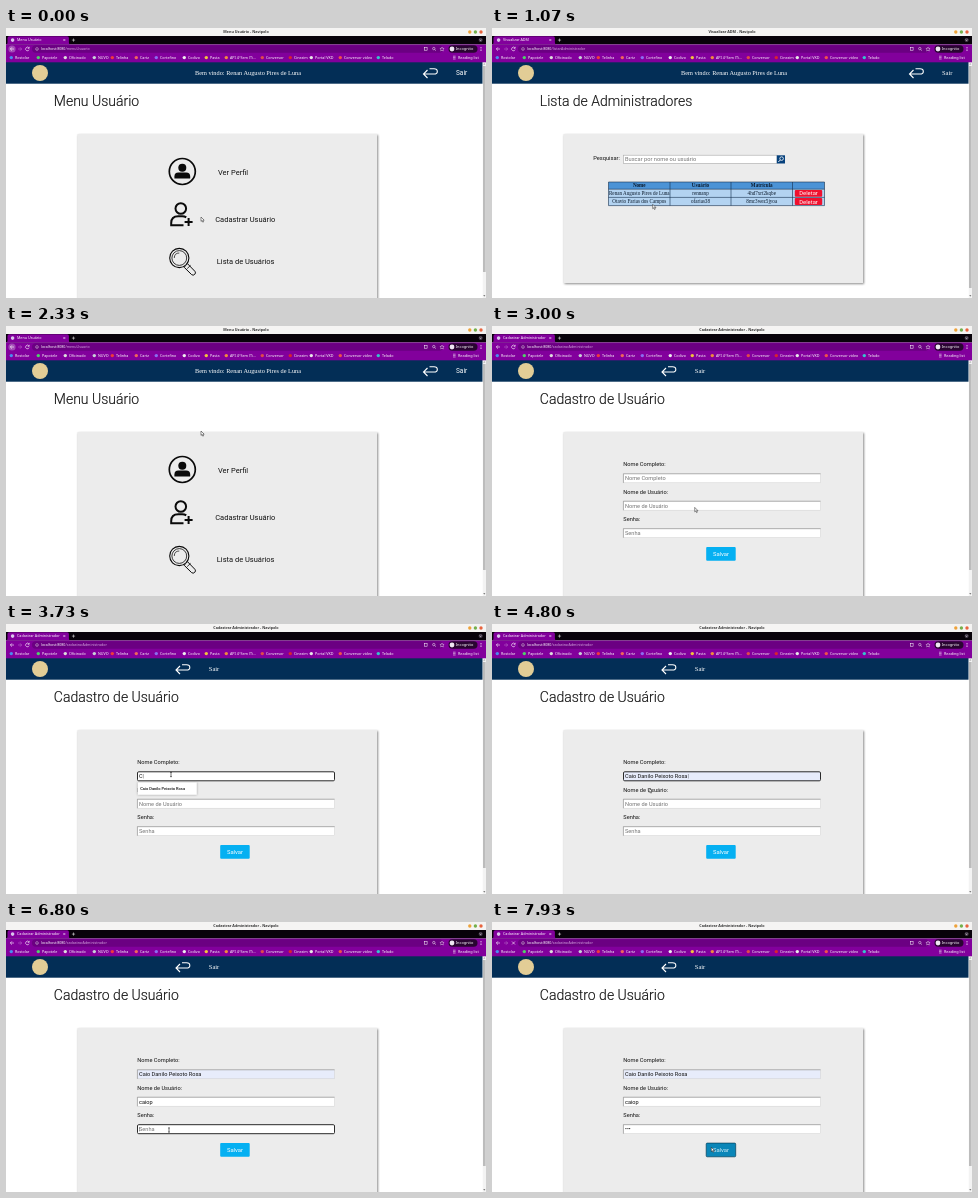
Write an HTML page that moves like this. It is 480 by 270 pixels and loops after 8000 ms.

```html
<!DOCTYPE html>
<html lang="pt-BR">
<head>
<meta charset="utf-8">
<title>Cadastro de Usuário</title>
<style>
html, body { margin: 0; width: 100%; height: 100%; overflow: hidden; background: #fff; }
svg { display: block; width: 100vw; height: 100vh; font-family: Roboto, sans-serif; }
.serif { font-family: "Liberation Serif", serif; }
.ui { font-family: "Noto Sans", sans-serif; }
.card { filter: drop-shadow(1px 1px 1px #8a8a8a); }
.drop { filter: drop-shadow(0 .5px 1px #999); }
</style>
</head>
<body>
<svg id="stage" viewBox="0 0 480 270" xmlns="http://www.w3.org/2000/svg">
  <defs><clipPath id="view"><rect y="34" width="476.7" height="236"/></clipPath></defs>
  <rect width="480" height="270" fill="#fff"/>
  <g clip-path="url(#view)"><g id="page"></g></g>
  <g id="bar"></g>
  <g id="chrome"></g>
  <g id="cursor"></g>
</svg>
<script>
const LOOP = 8000;
const USER = 'Renan Augusto Pires de Luna';
const PICK = 'Caio Danilo Peixoto Rosa';
const LOGIN = 'caiop';
const BROWSER = 'Navipolo';

const text = (x, y, s, size, fill = '#111', extra = '') =>
  `<text x="${x}" y="${y}" font-size="${size}" fill="${fill}" ${extra}>${s}</text>`;
const rect = (x, y, w, h, fill, extra = '') =>
  `<rect x="${x}" y="${y}" width="${w}" height="${h}" fill="${fill}" ${extra}/>`;
const dot = (x, y, r, fill, extra = '') =>
  `<circle cx="${x}" cy="${y}" r="${r}" fill="${fill}" ${extra}/>`;
const line = (d, color, w = 1, extra = '') =>
  `<path d="${d}" fill="none" stroke="${color}" stroke-width="${w}" ${extra}/>`;
const MID = 'text-anchor="middle"';

// Last value whose start time has passed
const step = (t, keys) => keys.reduce((v, [at, next]) => t >= at ? next : v, keys[0][1]);
const ease = p => p * p * (3 - 2 * p);

function tween(t, keys) {
  let i = 0;
  while (i < keys.length - 2 && t >= keys[i + 1][0]) i++;
  const [t0, ...a] = keys[i], [t1, ...b] = keys[i + 1];
  const p = ease(Math.min(1, Math.max(0, (t - t0) / (t1 - t0))));
  return a.map((v, k) => v + (b[k] - v) * p);
}

const PAGES = {
  menu: { tab: 'Menu Usuário', path: 'menuUsuario', thumb: 206 },
  list: { tab: 'Visualizar ADM', path: 'listarAdministrador', thumb: 222 },
  form: { tab: 'Cadastrar Administrador', path: 'cadastrarAdministrador', thumb: 206 }
};
const pageAt = t => step(t, [[0, 'menu'], [600, 'list'], [2000, 'menu'], [2870, 'form']]);
const scrollAt = t => t < 2000 ? tween(t, [[1130, 0], [1400, 9.4]])[0] : 0;

const TRACK = [
  [70, 195, 189], [430, 228, 233], [600, 228, 233], [1000, 160.7, 176.3],
  [1130, 160.7, 176.3], [1430, 163.2, 160.5], [1550, 163.2, 160.5], [1900, 6, 21],
  [2010, 6, 21], [2330, 195, 105], [2620, 212, 189], [2870, 212, 189],
  [3330, 165, 150.5], [3870, 165, 150.5], [4330, 157, 164], [5050, 157, 164],
  [5220, 161, 182], [6270, 161, 182], [6640, 163, 208], [7400, 163, 208],
  [7730, 219.3, 225.2], [8000, 219.3, 225.2]
];
const cursorAt = t => step(t, [[0, 'arrow'], [3250, 'beam'], [4150, 'arrow'], [5130, 'beam'], [7500, 'arrow']]);

const MARKS = [
  [9, 'Rostolar', '#4a8cf0'], [36, 'Papotele', '#4fd06a'], [63, 'Oficinado', '#ddd'], [92, 'NUVO', '#c8d0d8'],
  [110, 'Telinha', '#f03a3a'], [134, 'Cartz', '#f0665a'], [154, 'Cortefino', '#8a6cf0'], [182, 'Codivo', '#eee'],
  [204, 'Pasta', '#f2c33c'], [224, 'API 4°Sem (Ti...', '#f08a3c'], [260, 'Conversor', '#e04a4a'],
  [288, 'Cinezim', '#d8232f'], [309, 'Portal VKD', '#e8e8e8'], [338, 'Conversor video', '#f0504a'], [376, 'Telado', '#35c4cc']
];

function chrome(page, loading) {
  const { tab, path } = PAGES[page];
  const reload = loading
    ? line('M20 19.5l3 3m0-3l-3 3', '#fff', .6)
    : line('M22.9 20a1.8 1.8 0 1 0 .2 1.6M23.2 18.8v1.5h-1.5', '#fff', .6);
  return rect(0, 0, 480, 8, '#f5f4f3')
    + text(240, 5.3, `${tab} - ${BROWSER}`, 3.7, '#333', `${MID} class="ui" font-weight="600"`)
    + dot(463.8, 4, 1.7, '#eea23a') + dot(469.4, 4, 1.7, '#74b04c') + dot(475, 4, 1.7, '#e8643e')
    + rect(0, 8, 480, 8.5, '#08020a')
    + '<path d="M0 16.5q1.5 0 1.5-2V10q0-1.7 1.7-1.7h58q1.7 0 1.7 1.7v4.5q0 2 1.5 2z" fill="#82009c"/>'
    + dot(6.6, 12.1, 1.8, '#d9c7ec')
    + text(11, 13.4, tab, 3.7, '#fff', 'class="ui"')
    + line('M57.3 11l2 2m0-2l-2 2M67.5 10.5v3.2M65.9 12.1h3.2', '#fff', .5)
    + dot(474.6, 12.1, 2, '#4a4050') + line('M473.7 11.7l.9.9.9-.9', '#fff', .5)
    + rect(0, 16.5, 480, 17.8, '#82009c')
    + (page === 'menu' ? dot(6, 21, 3.6, '#a24bb6') : '')
    + line('M8 21H4.4M6 19.3L4.3 21 6 22.7', '#fff', .6)
    + line('M12 21h3.6M14 19.3l1.7 1.7-1.7 1.7', '#b96ac8', .6)
    + reload
    + rect(26, 17.3, 411, 7.4, '#6b0082', 'rx="3.7"')
    + dot(31, 21, 1.4, 'none', 'stroke="#ddd" stroke-width=".45"') + line('M31 20.8v1', '#ddd', .4)
    + `<text x="35" y="22.2" font-size="3.6" class="ui" fill="#fff">localhost:8080<tspan fill="#d6a5e0">/${path}</tspan></text>`
    + rect(418.5, 19.6, 2.6, 2.6, 'none', 'stroke="#fff" stroke-width=".5"')
    + dot(427.8, 20.6, 1.2, 'none', 'stroke="#fff" stroke-width=".5"') + line('M428.7 21.5l1.2 1.2', '#fff', .5)
    + '<path d="M436 19l.6 1.4 1.5.1-1.1 1 .3 1.5-1.3-.8-1.3.8.3-1.5-1.1-1 1.5-.1z" fill="none" stroke="#fff" stroke-width=".4"/>'
    + rect(442.5, 17.3, 29, 7.4, '#2a0532', 'rx="3.7"') + dot(446, 21, 2.4, '#efe6f2')
    + text(449.8, 22.4, 'Incognito', 3.9, '#fff', 'class="ui"')
    + [19.4, 21, 22.6].map(y => dot(475, y, .5, '#fff')).join('')
    + MARKS.map(([x, s, c]) => dot(x - 3.7, 29.6, 1.7, c) + text(x, 31, s, 3.7, '#fff', 'class="ui"')).join('')
    + line('M447 28.2h2.6M447 29.6h2.6M447 31h2.6', '#fff', .5)
    + text(452, 31, 'Reading list', 3.8, '#fff', 'class="ui"');
}

function scrollbar(page, scroll) {
  return rect(476.7, 34, 3.3, 236, '#f3f3f3')
    + rect(477, 38 + scroll * .8, 2.6, PAGES[page].thumb, '#bcbcbc')
    + '<path d="M477.2 36.6h2.2l-1.1-1.3z" fill="#999"/><path d="M477.2 267.2h2.2l-1.1 1.3z" fill="#555"/>';
}

function header(title, backX, sairX, font, hello) {
  return rect(0, 34, 477, 21.7, '#032e56')
    + dot(34, 45, 8, '#e2cd96')
    + (hello ? text(189, 47, `Bem vindo: ${USER}`, 6.3, '#fff', 'class="serif"') : '')
    + line(`M${backX + 4} 42l-4 4 4 4M${backX} 46h10.5q3.3 0 3.3-2.6t-3.3-2.6h-4.5`, '#fff', 1.1)
    + text(sairX, 47.2, 'Sair', 6.5, '#fff', `class="${font}"`)
    + text(47.8, 78.1, title, 14, '#111', 'font-weight="300" stroke="#111" stroke-width=".15"');
}
const card = h => rect(71.5, 106, 299.5, h, '#ececec', 'class="card"');

function menuPage() {
  return header('Menu Usuário', 417.5, 450, '', true) + card(190)
    + dot(176.3, 143.5, 13, 'none', 'stroke="#0a0a0a" stroke-width="1.7"')
    + dot(176.3, 139.7, 4, '#0a0a0a')
    + '<path d="M168.4 150.5v-2q0-4 4-4h7.8q4 0 4 4v2z" fill="#0a0a0a"/>'
    + dot(174.8, 180.5, 5.3, 'none', 'stroke="#0a0a0a" stroke-width="2"')
    + line('M177.5 197.3H165.2V195q0-6.8 7-6.8h4q2.5 0 4 1.2M182.6 190v8M178.6 194h8', '#0a0a0a', 2)
    + dot(173.3, 230, 9.6, 'none', 'stroke="#0a0a0a" stroke-width="1.1"')
    + dot(173.3, 230, 7.4, 'none', 'stroke="#0a0a0a" stroke-width=".8"')
    + line('M168.3 230q0-5 5-5', '#0a0a0a', .7)
    + '<path d="M179.6 237.6l1.9-1.9 7.4 7.6q1.3 1.6-.2 3.1t-3.1.2l-7.4-7.3z" fill="#ececec" stroke="#0a0a0a"/>'
    + line('M181.2 240.6l3.4-3.3', '#0a0a0a', .8)
    + text(212, 147.1, 'Ver Perfil', 7.5)
    + text(209.2, 193.6, 'Cadastrar Usuário', 7.5)
    + text(210.8, 235.6, 'Lista de Usuários', 7.5);
}

function listPage() {
  const cols = [116.5, 178, 239, 300.5, 332.5];
  const rows = [[USER, 'rennanp', '4hd7xrt2kqbe'], ['Otavio Farias dos Campos', 'ofarias38', '8mc3wez5jyoa']];
  const cell = (s, i, y, extra = '') =>
    text((cols[i] + cols[i + 1]) / 2, y, s, 5.1, '#0b1a2c', `${MID} class="serif" ${extra}`);
  return header('Lista de Administradores', 417.5, 450, 'serif', true) + card(149)
    + text(101.2, 132, 'Pesquisar:', 5.7)
    + rect(131.5, 127.2, 153.5, 8.2, '#fff', 'stroke="#aaa" stroke-width=".6"')
    + text(133, 133.2, 'Buscar por nome ou usuário', 5.7, '#757575')
    + rect(284.8, 127.3, 8.2, 8.2, '#06417c')
    + dot(289.6, 130.6, 1.8, 'none', 'stroke="#fff" stroke-width=".8"') + line('M288.3 132l-2 2', '#fff', .9)
    + rect(116.5, 154, 216, 7.2, '#4b93d6') + rect(116.5, 161.2, 216, 16.4, '#b3d3f1')
    + line('M116.5 154h216M116.5 161.2h216M116.5 169.4h216M116.5 177.6h216', '#16304e', .6)
    + line(cols.map(x => `M${x} 154v23.6`).join(''), '#16304e', .6)
    + ['Nome', 'Usuário', 'Matrícula'].map((s, i) => cell(s, i, 159.2, 'font-weight="700"')).join('')
    + rows.map((r, k) => r.map((s, i) => cell(s, i, 167 + k * 8.2)).join('')
      + rect(302.8, 161.9 + k * 8.2, 27.4, 6.8, '#f0102e', 'rx="1"')
      + text(316.5, 167.3 + k * 8.2, 'Deletar', 5.9, '#fff', MID)).join('');
}

function field(y, { value = '', hint = '', focus, auto }) {
  const fill = auto ? '#e7ecfb' : '#fff';
  const box = focus
    ? rect(131.5, y, 197, 9, fill, 'rx="1.2" stroke="#141414" stroke-width=".9"')
    : rect(131.5, y, 197, 9, fill, 'stroke="#cfcfcf" stroke-width=".5"') + line(`M131.4 ${y + 9}V${y}h197.2`, '#8c8c8c', .6);
  const caret = focus ? '<tspan font-weight="300">|</tspan>' : '';
  return box + (hint && !value ? text(133, y + 6.5, hint, 5.6, '#757575') : '')
    + `<text x="133" y="${y + 6.5}" font-size="5.6" fill="#111">${value}${caret}</text>`;
}

function dropdown(y, w, items, pad, hover) {
  const h = items.length * 9 + pad;
  return rect(131.8, y, w, h, '#fff', 'class="drop"')
    + (hover ? rect(131.8, y + pad / 2, w, 9, '#e9e9e9') : '')
    + items.map((s, i) => text(134.2, y + 6.5 + i * 9 + (pad - 2) / 2, s, 4, '#111', 'font-weight="500"')).join('');
}

const NAMES = ['Bruno Tavares Nobre Lins', PICK, 'Davi Moura Queiroz', 'Otavio Farias dos Campos', USER, 'Teste Cadastro'];
const LOGINS = ['rennanp', 'renanap', 'ofarias38', 'renanluna', 'Tabuado', 'Tabuado'];

function formPage(t) {
  const name = step(t, [[0, ''], [3730, PICK[0]], [4670, PICK]]);
  const typed = t < 5800 ? 0 : Math.floor((t - 5800) / 82) + 1;
  const dots = step(t, [[0, 0], [7070, 1], [7130, 2], [7330, 3]]);
  const focus = step(t, [[0, -1], [3400, 0], [5470, 1], [6670, 2], [7800, -1]]);
  const pressed = t >= 7800;
  const list = step(t, [[0, ''], [3470, 'names'], [3730, 'match'], [4670, ''], [5470, 'logins'], [5800, '']]);
  return header('Cadastro de Usuário', 170, 202.8, 'serif') + card(190)
    + text(131.3, 140.4, 'Nome Completo:', 5.65)
    + text(131.3, 167.9, 'Nome de Usuário:', 5.65)
    + text(131.3, 195.2, 'Senha:', 5.65)
    + field(147.8, { value: name, hint: 'Nome Completo', focus: focus === 0, auto: t >= 4670 })
    + field(175.2, { value: LOGIN.slice(0, typed), hint: 'Nome de Usuário', focus: focus === 1 })
    + field(202.7, { value: '•'.repeat(dots), hint: 'Senha', focus: focus === 2 })
    + rect(214.2, 221.1, 29.5, 13.7, pressed ? '#0a86b8' : '#05b0f2', pressed ? 'rx="1" stroke="#07405a" stroke-width=".7"' : 'rx="1"')
    + text(229, 230, 'Salvar', 5.9, pressed ? '#d5eef8' : '#fff', MID)
    + (list === 'names' ? dropdown(158.3, 71, NAMES, 2) : '')
    + (list === 'match' ? dropdown(158.3, 59, [PICK], 3.5, t >= 4250) : '')
    + (list === 'logins' ? dropdown(185.6, 47.5, LOGINS, 3) : '');
}

const POINTERS = {
  arrow: '<path d="M0 0V4.4l1-.9.8 1.7.8-.4-.8-1.6h1.4z" fill="#fff" stroke="#1c1c1c" stroke-width=".5"/>',
  beam: line('M-1-2.3q1 0 1 .7q0-.7 1-.7M0-1.6v3.2M-1 2.3q1 0 1-.7q0 .7 1 .7', '#111', .6)
};

const cache = {};
function put(id, markup) {
  if (cache[id] === markup) return;
  cache[id] = markup;
  document.getElementById(id).innerHTML = markup;
}

function draw(t) {
  const page = pageAt(t), scroll = scrollAt(t);
  put('page', page === 'menu' ? menuPage() : page === 'list' ? listPage() : formPage(t));
  document.getElementById('page').setAttribute('transform', `translate(0 ${-scroll})`);
  put('bar', scrollbar(page, scroll));
  put('chrome', chrome(page, t >= 7800));
  put('cursor', POINTERS[cursorAt(t)]);
  const [x, y] = tween(t, TRACK);
  document.getElementById('cursor').setAttribute('transform', `translate(${x} ${y})`);
}

const start = performance.now();
function tick() {
  draw((performance.now() - start) % LOOP);
  requestAnimationFrame(tick);
}
tick();
</script>
</body>
</html>
```
